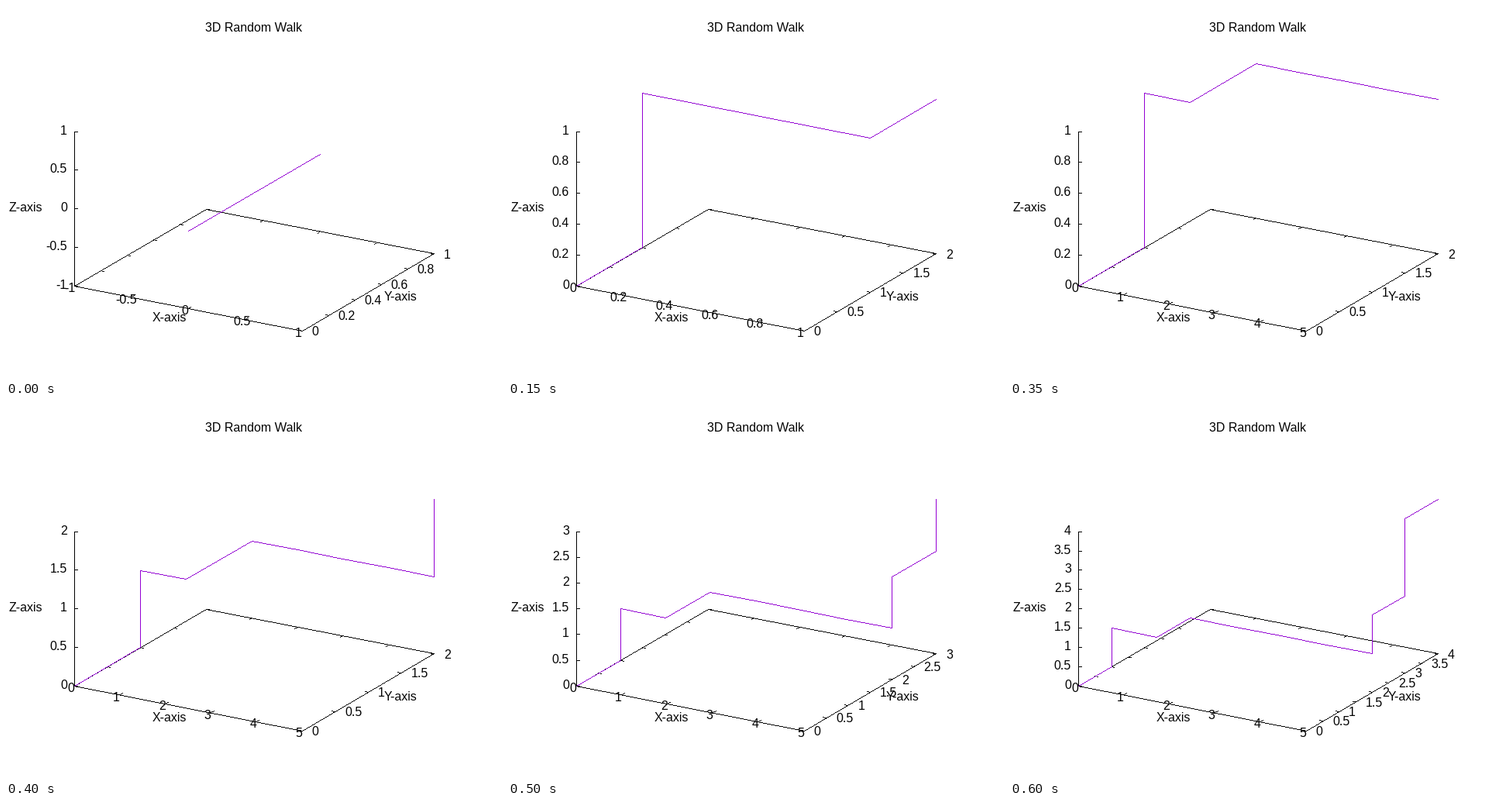
A matplotlib script that plays this animation: 640 px wide and 480 px high, repeating every 700 ms.

```python
import numpy as np
import matplotlib.pyplot as plt
from matplotlib.animation import FuncAnimation

W, H, DPI = 640, 480, 100
PX = 72 / DPI
BLACK, PURPLE = (0, 0, 0), (148, 0, 211)

# Screen position of the box corner and of its three edge vectors.
ORIGIN = np.array([88.0, 360.8])
EDGES = np.array([[293.6, 57.8], [170.3, -99.2], [0, -199.2]])

STEPS = ["xyz".index(c) for c in "yzxyxxxxzyzzy"]
WALK = np.vstack([np.zeros(3), np.cumsum(np.eye(3)[STEPS], axis=0)])

plt.rcParams["font.family"] = "Liberation Sans"
plt.rcParams["text.hinting"] = "default"
fig = plt.figure(figsize=(W / DPI, H / DPI), dpi=DPI, facecolor="white")
ax = fig.add_axes([0, 0, 1, 1])
ax.axis("off")
canvas = np.full((H, W, 3), 255, np.uint8)
image = ax.imshow(canvas, extent=(0, W, H, 0), interpolation="nearest",
                  aspect="auto")


def project(unit):
    return ORIGIN + np.asarray(unit, float) @ EDGES


def line(a, b, color=BLACK):
    """Unsmoothed line, one pixel per step along its longer side."""
    a, b = np.round(a), np.round(b)
    n = int(np.abs(b - a).max())
    x, y = np.round(np.linspace(a, b, n + 1)).astype(int).T
    canvas[y, x] = color


def text(x, y, s, ha="left"):
    ax.text(x, round(y), s, ha=ha, va="baseline", size=16 * PX, color="black")


def limits(v):
    lo, hi = v.min(), v.max()
    return (lo - 1, hi + 1) if lo == hi else (lo, hi)


def ticks(lo, hi):
    span = hi - lo
    step = 0.2 if span <= 1 else 0.5 if span < 5 else 1
    for k in range(round(span / step) + 1):
        value = round(lo + k * step, 6) + 0.0
        yield k * step / span, f"{value:g}"


def tick(pos, direction):
    line(pos, pos + 4 * direction / np.hypot(*direction))


def draw_axes(bounds):
    ex, ey, _ = EDGES
    base = [project(c) for c in ((0, 0, 0), (1, 0, 0), (1, 1, 0), (0, 1, 0))]
    for a, b in zip(base, base[1:] + base[:1]):
        line(a, b)
    line(base[0], project((0, 0, 1)))

    for u, s in ticks(*bounds[0]):
        p = project((u, 0, 0))
        tick(p, ey)
        tick(project((u, 1, 0)), -ey)
        text(p[0] - (6 if s[0] == "-" else 4), p[1] + 8.3, s, "center")
    for u, s in ticks(*bounds[1]):
        p = project((1, u, 0))
        tick(p, -ex)
        tick(project((0, u, 0)), ex)
        text(p[0] + 13, p[1] + 6.2, s)
    for u, s in ticks(*bounds[2]):
        p = project((0, 0, u))
        tick(p, np.array([1.0, 0.0]))
        text(79, p[1] + 4, s, "right")

    text(257, 33, "3D Random Walk")
    text(189, 407, "X-axis")
    text(488, 380, "Y-axis")
    text(3, 265, "Z-axis")


def draw(i):
    for label in list(ax.texts):
        label.remove()
    canvas[:] = 255
    path = WALK[:min(i + 2, len(WALK))]
    bounds = np.array([limits(v) for v in path.T])
    draw_axes(bounds)
    lo, hi = bounds.T
    pts = project((path - lo) / (hi - lo))
    for a, b in zip(pts, pts[1:]):
        line(a, b, PURPLE)
    image.set_data(canvas)
    return [image, *ax.texts]


# The finished walk is held for one extra tick.
anim = FuncAnimation(fig, draw, frames=len(STEPS) + 1, interval=50,
                     init_func=lambda: draw(0), repeat=True, repeat_delay=0)
plt.show()
```
